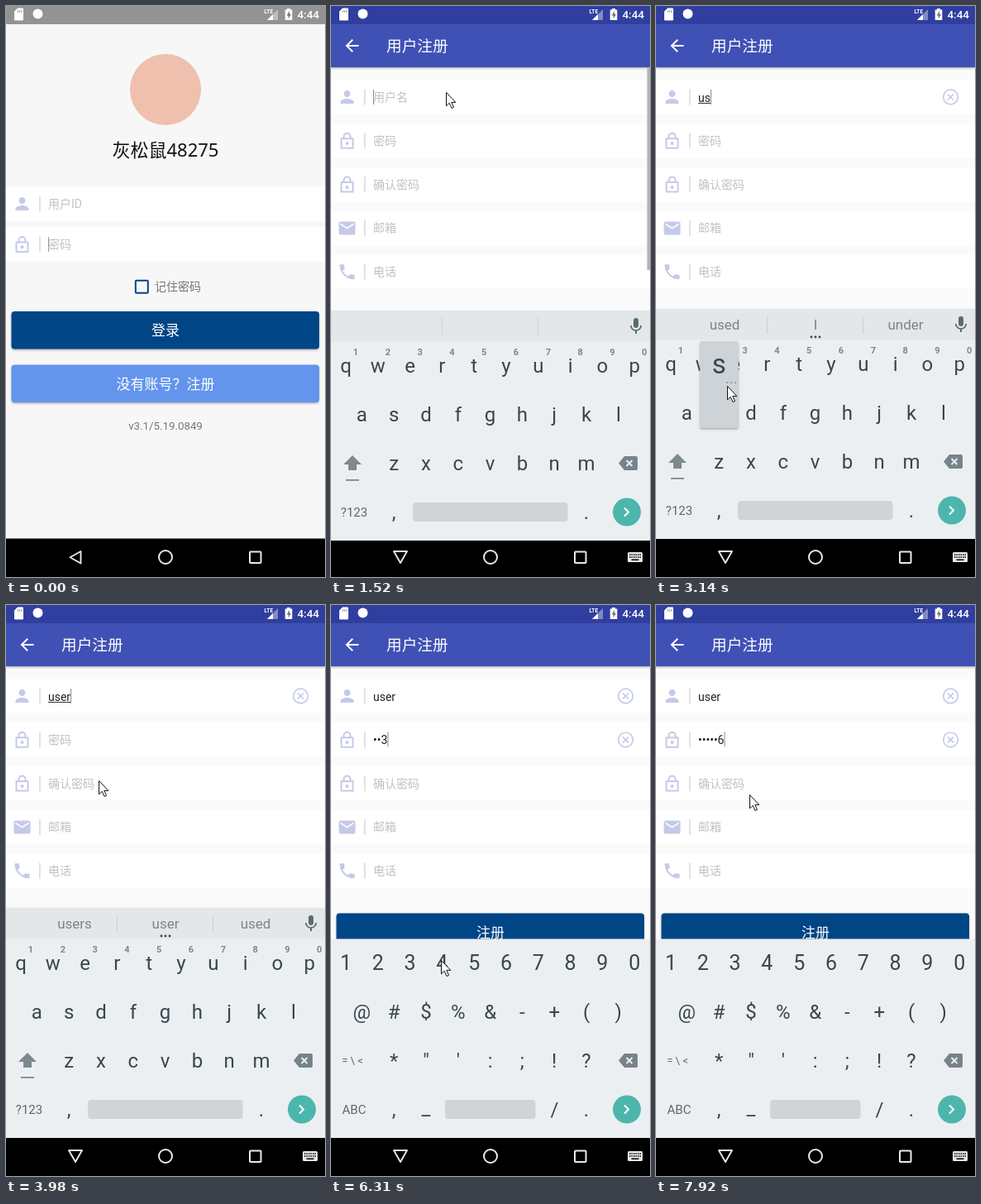
Write an HTML page that moves like this. It is 386 by 690 pixels and loops after 8 s.

```html
<!DOCTYPE html>
<html lang="zh-CN">
<head>
<meta charset="utf-8">
<title>用户注册</title>
<style>
html, body { margin: 0; width: 100%; height: 100%; overflow: hidden; background: #f7f7f7; }
svg { display: block; width: 100vw; height: 100vh; }
text { font-family: Roboto, "Noto Sans CJK SC", "Noto Sans CJK", sans-serif; white-space: pre; }
</style>
</head>
<body>
<svg id="stage" viewBox="0 0 386 690"></svg>
<script>
const LOOP = 8000;
const INK = '#37474f', NAVY = '#004485', PALE = '#c5cae9';
const ICON = {
  person: 'M12 12c2.21 0 4-1.79 4-4s-1.79-4-4-4-4 1.79-4 4 1.79 4 4 4zm0 2c-2.67 0-8 1.34-8 4v2h16v-2c0-2.66-5.33-4-8-4z',
  mail: 'M20 4H4a2 2 0 0 0-2 2v12a2 2 0 0 0 2 2h16a2 2 0 0 0 2-2V6a2 2 0 0 0-2-2zm0 4l-8 5-8-5V6l8 5 8-5z',
  phone: 'M6.6 10.8c1.4 2.8 3.8 5.1 6.6 6.6l2.2-2.2c.3-.3.7-.4 1-.2 1.1.4 2.3.6 3.6.6.6 0 1 .4 1 1V20c0 .6-.4 1-1 1C10.600 21 3 13.400 3 4c0-.6.5-1 1-1h3.500c.6 0 1 .4 1 1 0 1.300.2 2.500.6 3.600.1.300 0 .7-.2 1z',
  back: 'M20 11H7.8l5.600-5.600L12 4l-8 8 8 8 1.400-1.400L7.800 13H20z',
  mic: 'M12 14c1.700 0 3-1.300 3-3V5a3 3 0 0 0-6 0v6c0 1.700 1.300 3 3 3zm5.300-3a5.300 5.300 0 0 1-10.600 0H5c0 3.400 2.700 6.200 6 6.700V21h2v-3.300c3.300-.5 6-3.300 6-6.700z'
};

const rect = (x, y, w, h, fill, more = '') => `<rect x="${x}" y="${y}" width="${w}" height="${h}" fill="${fill}" ${more}/>`;
const text = (x, y, s, size, fill, more = 'text-anchor="middle"') =>
  `<text x="${x}" y="${y}" font-size="${size}" fill="${fill}" ${more}>${s.replace(/&/g, '&amp;').replace(/</g, '&lt;')}</text>`;
const left = 'text-anchor="start"';
const path = (d, fill, more = '') => `<path d="${d}" fill="${fill}" ${more}/>`;
const line = (d, color, w, more = '') => path(d, 'none', `stroke="${color}" stroke-width="${w}" ${more}`);
const circle = (x, y, r, fill, more = '') => `<circle cx="${x}" cy="${y}" r="${r}" fill="${fill}" ${more}/>`;
const group = (id, body, more = '') => `<g id="${id}" ${more}>${body}</g>`;
const icon = (name, x, y, fill) => name === 'lock'
  ? line(`M${x - 7} ${y - 2.500}h14v11.500h-14zM${x - 4} ${y - 2.500}v-2.500a4 4 0 0 1 8 0v2.500`, fill, 2, 'stroke-linejoin="round"') + circle(x, y + 3.300, 2, fill)
  : path(ICON[name], fill, `transform="translate(${x - 12} ${y - 12})"`);

function button(id, y, fill, label) {
  return group(id, rect(6.5, y, 372.500, 45.500, fill, 'rx="4" filter="url(#lift)"')) + text(193, y + 29, label, 17, '#fff');
}

function field(y, h, name, hint, id) {
  return rect(0, y - h / 2, 386, h, '#fff') + icon(name, 19.500, y, PALE) +
    rect(40.300, y - 9.500, 1.300, 19, '#d2d2d6') + group(id, text(51, y + 5, hint, 14, '#c2c2c2', left));
}

function clearMark(id, y) {
  return group(id, circle(356.500, y, 8.800, 'none', `stroke="${PALE}" stroke-width="1.700"`) +
    line(`M353 ${y - 3.500}l7 7m0-7l-7 7`, PALE, 1.700));
}

function login() {
  return rect(0, 0, 386, 644, '#f7f7f7') + rect(0, 0, 386, 22, '#939393') +
    circle(193, 101, 43, '#efc0ad') +
    text(193, 182, '灰松鼠48275', 22, '#111', `text-anchor="middle" style="font-family:'Noto Sans','Noto Sans CJK SC',sans-serif"`) +
    field(239, 42, 'person', '用户ID', 'h0') + field(288, 42, 'lock', '密码', 'h1') +
    group('loginCaret', rect(51, 279, 1, 18, '#999')) +
    rect(156.800, 331.800, 15, 15, 'none', `rx="1" stroke="${NAVY}" stroke-width="2"`) +
    text(180, 344, '记住密码', 14, '#757575', left) +
    button('enter', 369, NAVY, '登录') + button('join', 433.500, '#6495ed', '没有账号？注册') +
    text(193, 511.500, 'v3.1/5.19.0849', 13.300, '#757575');
}

function register() {
  const rows = [['person', '用户名'], ['lock', '密码'], ['lock', '确认密码'], ['mail', '邮箱'], ['phone', '电话']];
  return rect(0, 0, 386, 644, '#fafafa') +
    rect(0, 22, 386, 52, '#3f51b5', 'filter="url(#lift)"') + rect(0, 0, 386, 22, '#303f9f') +
    icon('back', 25.500, 48, '#fff') + text(67, 54.500, '用户注册', 18.700, '#fff', left) +
    rows.map(([n, s], i) => field(110 + i * 52.800, 41, n, s, 'f' + i)).join('') +
    `<text id="user" x="51" y="115.500" font-size="14" fill="#212121"></text>` +
    `<text id="pass" x="51" y="168" font-size="14" fill="#212121"></text>` +
    rect(51, 117, 0, 1, '#333', 'id="under"') + rect(51, 101, 1, 18, '#8a8a8a', 'id="caret"') +
    clearMark('clearUser', 110) + clearMark('clearPass', 162.800) +
    button('submit', 372.500, NAVY, '注册') +
    rect(382.500, 74, 3.500, 245, '#b4b4b4', 'id="scroll"');
}

const keyX = i => 18 + i * 38.800;
const keyRow = (s, from, y, size = 24) => [...s].map((c, i) => text(keyX(from + i), y, c, size, INK)).join('');

function keyboard() {
  const strip = rect(0, 366, 386, 38, '#e3e7e9', 'filter="url(#lift)"') +
    rect(134, 374, 1, 22, '#ccd2d5') + rect(250, 374, 1, 22, '#ccd2d5') +
    icon('mic', 369, 385, '#5c6a71') +
    group('words', [83, 193, 302].map((x, i) => text(x, 391, '', 17, '#78848a', `text-anchor="middle" id="w${i}"`)).join('') +
      [188, 193, 198].map(x => circle(x, 400, 1.400, INK)).join(''));
  const letters = keyRow('qwertyuiop', 0, 441) + keyRow('asdfghjkl', .5, 500) + keyRow('zxcvbnm', 1.5, 559) +
    [...'1234567890'].map((c, i) => text(keyX(i) + 12, 420, c, 11, '#7d878c', 'text-anchor="middle" font-weight="700"')).join('') +
    path('M26 541l11 11h-6v7h-10v-7h-6z', '#7d898f') + rect(18, 570, 16, 1.800, '#7d898f') +
    text(28, 615, '?123', 15, '#5a686f') + rect(99, 598, 187.500, 23, '#cfd4d7', 'rx="4"');
  const symbols = keyRow('1234567890', 0, 441, 25) + keyRow('@#$%&-+()', .5, 500) + keyRow('*"\':;!?', 1.5, 559) +
    text(26, 555, '= \\ <', 13, '#5a686f') + text(28, 615, 'ABC', 15, '#5a686f') +
    text(115, 616, '_', 24, INK) + text(270.500, 618, '/', 24, INK) + rect(138, 598, 109.500, 23, '#cfd4d7', 'rx="4"');
  return group('strip', strip) + rect(0, 403.500, 386, 240.500, '#eceff1') +
    rect(0, 0, 0, 0, '#cdd2d5', 'id="press" rx="1"') +
    group('letters', letters) + group('symbols', symbols) +
    text(76, 618, ',', 24, INK) + text(309, 618, '.', 24, INK) +
    path('M355 542h14a2 2 0 0 1 2 2v13a2 2 0 0 1-2 2h-14l-7-8.500z', '#76838a') +
    line('M357.500 547l7 7m0-7l-7 7', '#eceff1', 1.900) +
    circle(358, 609.500, 17, '#4db6ac') + line('M355 604.500l5 5-5 5', '#fff', 2) +
    group('popup', rect(-23, 0, 46.500, 105, '#cdd3d6', 'rx="2" filter="url(#lift)"') +
      text(0, 39, '', 33, INK, 'text-anchor="middle" id="popChar"') +
      [10, 15, 20].map(x => circle(x, 50, 1, '#87939a')).join(''));
}

function statusIcons() {
  return path('M14 3h6.500v14h-10v-10.500z', '#fff', 'stroke="#fff" stroke-linejoin="round"') +
    line('M14.500 5v3m2-3v3m2-3v3', '#999', .9) + circle(38.500, 9.500, 6, '#fff') +
    text(312.500, 8.500, 'LTE', 6.500, '#fff', 'text-anchor="start" font-weight="700"') +
    path('M329 4v13h-13z', '#fff', 'opacity=".4"') + path('M323 10v7h-7z', '#fff') +
    path('M340 3h4v1.500h2.300v12.500h-8.600v-12.500h2.300z', '#fff') + path('M343 6l-3.300 5.500h2v4l3.300-5.500h-2z', '#000', 'opacity=".55"') +
    text(379, 14.800, '4:44', 13.500, '#fff', 'text-anchor="end" font-weight="500"');
}

function navIcons() {
  const soft = 'stroke-linejoin="round"';
  return group('navBack', line('M90.500 659v14.500l-13-7.250z', '#e8e8e8', 1.900, soft)) +
    group('navDown', line('M76 659h16l-8 14z', '#e8e8e8', 1.900, soft) + rect(359, 660, 18, 12, '#e8e8e8', 'rx="1.500"') +
      line('M361 663h14m-14 3h14', '#000', 1.500, 'stroke-dasharray="1.500 1"') + rect(363.500, 668.500, 9, 1.500, '#000')) +
    circle(193, 666, 8, 'none', 'stroke="#e8e8e8" stroke-width="2"') +
    rect(295, 659.500, 13.500, 13.500, 'none', 'rx="1" stroke="#e8e8e8" stroke-width="2"');
}

document.getElementById('stage').innerHTML =
  `<defs><filter id="lift" x="-10%" y="-20%" width="120%" height="150%"><feDropShadow id="lifted" dx="0" dy="1.300" stdDeviation="1.200" flood-opacity=".32"/></filter>
  <filter id="high" x="-10%" y="-20%" width="120%" height="150%"><feDropShadow dx="0" dy="3" stdDeviation="2" flood-opacity=".45"/></filter></defs>` +
  rect(0, 0, 386, 690, '#000') + login() + rect(0, 643.500, 386, 46.500, '#000') +
  group('page', register()) + group('board', keyboard()) +
  statusIcons() + navIcons() +
  group('mouse', path('M.5 .5v16.300l3.700-3.500 2.800 6.200 2.500-1.100-2.700-6h5z', '#fff', 'stroke="#111" stroke-width="1" stroke-linejoin="round"'));

const el = {};
document.querySelectorAll('[id]').forEach(n => el[n.id] = n);
const set = (id, props) => { for (const k in props) el[id].setAttribute(k, props[k]); };
const show = (id, on) => set(id, { visibility: on ? 'visible' : 'hidden' });

// Each key is [time, ...values]; values between keys are linear.
function track(keys, t) {
  let i = 0;
  while (i < keys.length - 2 && t >= keys[i + 1][0]) i++;
  const a = keys[i], b = keys[i + 1];
  const p = Math.min(1, Math.max(0, (t - a[0]) / (b[0] - a[0])));
  return a.slice(1).map((v, k) => v + (b[k + 1] - v) * p);
}
const latest = (list, t) => list.filter(e => t >= e[0]).pop();

const MOUSE = [
  [120, 331, 667], [590, 190, 452], [1050, 190, 452], [1140, 166, 324], [1200, 166, 324], [1440, 139, 104], [1890, 139, 104],
  [2330, 252, 436], [2510, 252, 436], [2660, 222, 473], [2740, 175, 490], [2890, 86, 459], [3210, 86, 459],
  [3380, 97, 436], [3480, 97, 436], [3620, 134, 434], [3720, 134, 434], [3830, 123, 256], [3900, 118, 230],
  [4210, 95, 160], [4580, 95, 160], [4960, 40, 601], [5170, 40, 601], [5210, 40, 522], [5290, 34, 490],
  [5440, 21, 433], [5620, 21, 433], [5760, 32, 432], [5920, 32, 432], [6000, 60, 433], [6080, 60, 433],
  [6180, 98, 432], [6250, 98, 432], [6310, 133, 429], [6500, 133, 429], [6680, 162, 432], [6850, 172, 434],
  [7080, 172, 434], [7300, 214, 436], [7460, 214, 436], [7540, 225, 433], [7610, 225, 433], [7920, 113, 229]
];
const SLIDE = [[1050, 45, 0], [1070, 38, .35], [1140, 12.3, .88], [1180, 12.3, .88], [1240, 3, 1], [1320, 0, 1]];
const RISE = [[1360, 70, 0], [1440, 18, .8], [1520, 2, 1], [1580, 2, 1], [1600, 0, 1]];
const LETTERS = [[2380, 'u', 6], [3060, 's', 1.5], [3400, 'e', 2], [3650, 'r', 3]];
const DIGITS = [5610, 6010, 6200, 6400, 6780, 7440];
const WORDS = [[2740, 'used', 'I', 'under'], [3230, 'used', 'us', 'use'], [3520, 'used', 'use', 'user'], [3800, 'users', 'user', 'used']];
const TO_PASS = 4440, TO_PLAIN = 4520, TO_SYMBOLS = 5060;

function draw(t) {
  const [mx, my] = track(MOUSE, t);
  show('mouse', t >= 120);
  set('mouse', { transform: `translate(${mx} ${my})` });

  show('loginCaret', t < 120 || t >= 590);
  el.join.firstChild.setAttribute('filter', t >= 740 && t < 1200 ? 'url(#high)' : 'url(#lift)');

  const [py, pa] = track(SLIDE, t);
  set('page', { transform: `translate(0 ${py})`, opacity: pa, display: t < 1050 ? 'none' : 'inline' });
  const [ky, ka] = track(RISE, t);
  set('board', { transform: `translate(0 ${ky})`, opacity: ka, display: t < 1360 ? 'none' : 'inline' });
  show('navBack', t < 1440);
  show('navDown', t >= 1440);
  set('scroll', { opacity: t < 1440 ? 0 : track([[1890, 1], [2200, 0]], t)[0] });

  const typed = LETTERS.filter(k => t >= k[0]), dots = DIGITS.filter(k => t >= k).length;
  const name = typed.map(k => k[1]).join('');
  el.user.textContent = name;
  el.pass.textContent = dots ? '•'.repeat(dots - 1) + dots : '';
  show('f0', !name);
  show('f1', !dots);
  show('clearUser', name);
  show('clearPass', dots);

  const inPass = t >= TO_PASS;
  const width = el[inPass ? 'pass' : 'user'].getComputedTextLength();
  const since = latest([[1060], ...LETTERS, [TO_PASS], ...DIGITS.map(d => [d])], t);
  set('caret', { x: 51 + width, y: inPass ? 153.5 : 101 });
  show('caret', since && (t - since[0]) % 1000 < 500);
  set('under', { width: inPass ? 0 : width });

  const plain = t >= TO_PLAIN, symbols = t >= TO_SYMBOLS;
  show('strip', !plain);
  show('letters', !symbols);
  show('symbols', symbols);
  const words = latest(WORDS, t);
  set('words', { display: words && !plain ? 'inline' : 'none' });
  if (words) [0, 1, 2].forEach(i => el['w' + i].textContent = words[i + 1]);

  const key = latest(LETTERS, t), popped = key && t < key[0] + 140;
  set('popup', { display: popped ? 'inline' : 'none' });
  if (popped) {
    el.popChar.textContent = key[1];
    set('popup', { transform: `translate(${keyX(key[2])} ${key[1] === 's' ? 405 : 346})` });
  }

  const digit = DIGITS[dots - 1];
  if (t >= 5000 && t < 5200) set('press', { x: 2, y: 587, width: 52, height: 45 });
  else if (dots && t < digit + 80) set('press', { x: keyX(dots - 1) - 17, y: 407, width: 35, height: 46 });
  else set('press', { width: 0 });
}

let start;
function tick(now) {
  start ??= now;
  draw((now - start) % LOOP);
  requestAnimationFrame(tick);
}
draw(0);
requestAnimationFrame(tick);
</script>
</body>
</html>
```
